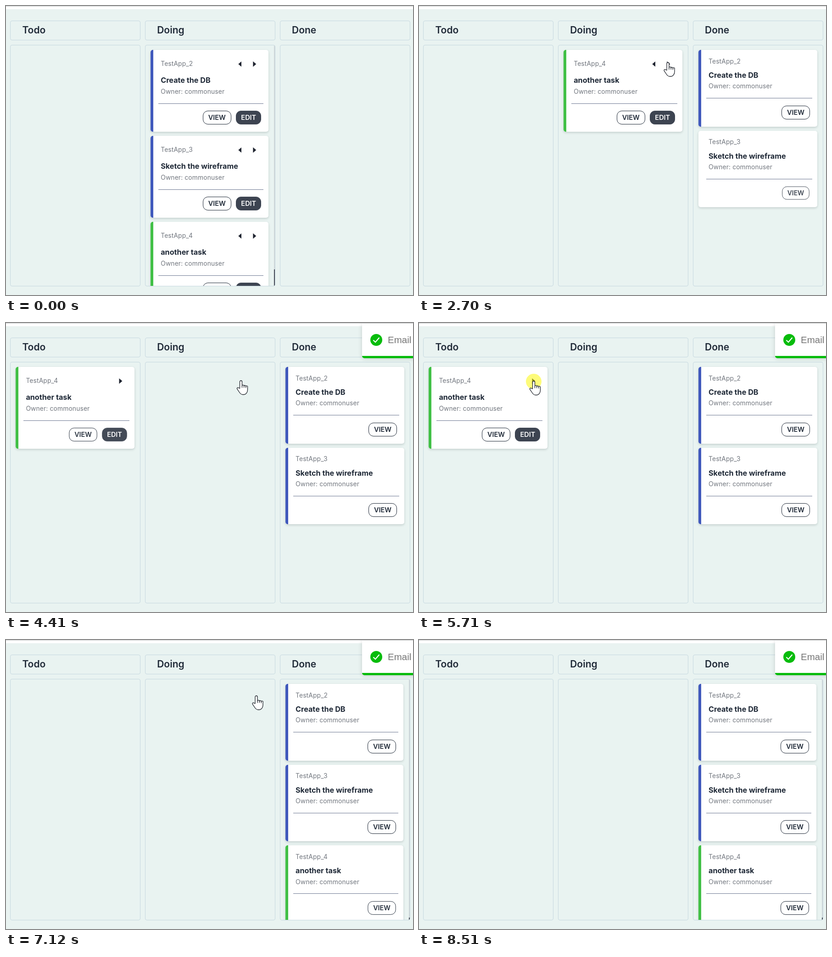
An HTML page that plays this animation: 887x632 px, repeating every 9.04 s.

```html
<!DOCTYPE html>
<html lang="en">
<head>
<meta charset="utf-8">
<title>Task board</title>
<style>
  html, body { margin: 0; width: 100%; height: 100%; overflow: hidden; }
  body { background: #e9f3f1; }
  #stage { position: relative; width: 887px; height: 632px; overflow: hidden; font-family: Inter, sans-serif; color: #1f2937; }
  #stage div { position: absolute; box-sizing: border-box; white-space: nowrap; }
  .top { left: 0; top: 0; width: 887px; height: 7px; background: #fff; border-top: 1px solid #c6c8c9; }
  .head, .body { width: 284px; border: 1px solid #c6d8e0; border-radius: 4px; }
  .head { top: 32px; height: 43px; padding-left: 25px; font: 600 21px/39px Inter, sans-serif; }
  .body { top: 85px; height: 528px; overflow: hidden; }
  .card { left: 11px; background: #fff; border-radius: 5px; box-shadow: 0 2px 5px rgba(40, 60, 60, .2); overflow: hidden; }
  .stripe { left: 0; top: 0; width: 6px; height: 100%; }
  .text { left: 22px; line-height: 20px; margin-top: -10.6px; }
  .small { font-size: 13.8px; color: #71767e; letter-spacing: .15px; }
  .title { font-size: 16.2px; font-weight: 700; }
  .rule { left: 17px; right: 11px; height: 1px; background: #6b7691; }
  .btn { right: 15.5px; width: 62px; height: 30px; border: 1px solid #1f2937; border-radius: 11px; text-align: center; font: 600 14.5px/28px Inter, sans-serif; }
  .edit { width: 55px; background: #3d4451; border-color: #3d4451; color: #fff; }
  .edit + .btn { right: 81px; }
  .tri { top: 25px; width: 7px; height: 12px; background: #1f2430; }
  .next { right: 26.5px; clip-path: polygon(0 0, 100% 50%, 0 100%); }
  .prev { right: 58.5px; clip-path: polygon(100% 0, 0 50%, 100% 100%); }
  .track { right: 0; top: 0; width: 2px; height: 526px; background: #cfd7d8; }
  .thumb { right: 0; bottom: 0; width: 2px; background: #474b57; }
  #toast { left: 776px; top: 1px; width: 960px; height: 76px; background: #fff; border-radius: 0 0 0 5px; box-shadow: 0 1px 10px rgba(0, 0, 0, .16); overflow: hidden; }
  #bar { left: 0; bottom: 0; height: 5px; background: #07bc0c; }
  #toast svg { position: absolute; left: 18px; top: 23px; }
  .msg { left: 56px; top: 22.5px; font: 20.5px/25px "Liberation Sans", Arial, sans-serif; color: #757575; }
  #glow { width: 34px; height: 34px; border-radius: 50%; background: rgba(252, 247, 0, .52); }
  #overlay { position: absolute; left: 0; top: 0; }
</style>
</head>
<body>
<div id="stage">
  <div class="top"></div>
  <div id="board" style="left:0;top:0"></div>
  <div id="toast">
    <svg width="26" height="26"><circle cx="13" cy="13" r="13" fill="#07bc0c"/><path d="M6.5 13.5l4.5 4.5 8.5-10" fill="none" stroke="#fff" stroke-width="2.2"/></svg>
    <div class="msg">Email</div>
    <div id="bar"></div>
  </div>
  <div id="glow"></div>
  <svg id="overlay" width="887" height="632">
    <g id="cursor" fill="#fff" stroke="#20242c" stroke-width="1.3" stroke-linejoin="round">
      <g id="hand">
        <path d="M-2.5 17V2.5a2.5 2.5 0 0 1 5 0V11a2.2 2.2 0 0 1 4.2 .6a2.2 2.2 0 0 1 4.1 .9a2 2 0 0 1 3.7 1.5V20c0 5-3 10.5-8.5 10.5H4c-3.5 0-5-1.5-7-4.5L-8 18.6c-1.6-2.4 1-4.4 3-2.8z"/>
        <path d="M2.5 11v4.5M6.7 11.6v4M10.8 12.5v3.5" fill="none"/>
      </g>
      <path id="arrow" d="M0 0V21l5-4.6 3.4 7.6 3.3-1.5-3.3-7.3h6.6z"/>
    </g>
  </svg>
</div>
<script>
const LOOP = 9040;
const COLUMNS = ['Todo', 'Doing', 'Done'];
const BLUE = '#4059bc', GREEN = '#41c046';
const TASKS = [
  { id: 2, title: 'Create the DB', color: BLUE },
  { id: 3, title: 'Sketch the wireframe', color: BLUE },
  { id: 4, title: 'another task', color: GREEN }
];

// The pointer glides to a spot, clicks, and the task shifts one column.
const START = { x: 848, y: 410 };
const MOVES = [
  { from: 330, to: 1160, x: 546, y: 122, click: 1290, task: 2, dir: 1 },
  { from: 1880, to: 2310, x: 542.5, y: 123.5, click: 2510, task: 3, dir: 1 },
  { from: 3600, to: 3940, x: 512, y: 126, click: 4150, task: 4, dir: -1 },
  { from: 4880, to: 5640, x: 250, y: 127, click: 5710, task: 4, dir: 1 },
  { from: 5980, to: 6530, x: 545.5, y: 122, click: 6860, task: 4, dir: 1 }
];
const EXIT = { from: 7300, to: 8300, x: 790, y: 640 };
const GLOW_TIME = 130, MOVE_DELAY = 190;
const TOAST_IN = 2770, TOAST_AGAIN = 7810, TOAST_LIFE = 5000;

const $ = id => document.getElementById(id);
const show = (id, on) => { $(id).style.display = on ? '' : 'none'; };
const clamp = p => Math.min(1, Math.max(0, p));
const smooth = p => p * p * (3 - 2 * p);
const easeOut = p => 1 - (1 - p) ** 3;
const easeInBack = p => p * p * (2.7 * p - 1.7);
const box = (cls, style, text = '') => `<div class="${cls}" style="${style}">${text}</div>`;

function card(task, col, top, width, fresh) {
  const done = col === 2;
  const lift = done ? 11.5 : 0;
  const pop = fresh ? ' pop' : '';
  const line = (cls, y, text) => box('text ' + cls, `top:${y}px`, text);
  const button = (cls, text) => box('btn' + cls + pop, `top:${133 - lift}px`, text);
  const html = box('stripe' + (fresh ? ' new' : ''), `background:${task.color}`)
    + line('small', 31 - lift / 2, 'TestApp_' + task.id)
    + line('title', 67 - lift, task.title)
    + line('small', 91.5 - lift, 'Owner: commonuser')
    + box('rule', `top:${116.5 - lift}px`)
    + (done ? '' : button(' edit', 'EDIT') + box('tri next', ''))
    + (col === 1 ? box('tri prev', '') : '');
  // VIEW follows EDIT directly so that it can make room for it
  const view = button('', 'VIEW');
  const body = done ? html + view : html.replace('<div class="tri', view + '<div class="tri');
  return box('card', `top:${top}px;width:${width}px;height:${179 - lift}px`, body);
}

function column(tasks, col, moved) {
  const left = 9.4 + col * 293.8;
  const scroll = tasks.length > 2;
  const pitch = col === 2 ? 176.6 : 188;
  const width = scroll ? 256.6 : 258.6;
  const cards = tasks.map((task, i) => card(task, col, 10 + i * pitch, width, task.id === moved));
  const bar = scroll ? box('track', '') + box('thumb', `height:${col === 2 ? 5 : 36}px`) : '';
  return box('head', `left:${left}px`, COLUMNS[col])
    + box('body', `left:${left}px`, cards.join('') + bar);
}

let shown = -1;
function drawBoard(t) {
  const past = MOVES.filter(m => t >= m.click + MOVE_DELAY);
  const last = past[past.length - 1];
  if (past.length !== shown) {
    shown = past.length;
    const place = task => past.reduce((col, m) => m.task === task.id ? col + m.dir : col, 1);
    $('board').innerHTML = COLUMNS.map((_, col) =>
      column(TASKS.filter(task => place(task) === col), col, last && last.task)).join('');
  }
  if (!last) return;
  const age = t - last.click - MOVE_DELAY;
  const p = easeOut(clamp(age / 200));
  for (const el of document.querySelectorAll('.pop')) {
    el.style.transform = p < 1 ? `scale(${.96 + .04 * p})` : 'none';
    el.style.opacity = .85 + .15 * p;
  }
  for (const el of document.querySelectorAll('.new')) el.style.visibility = age < 65 ? 'hidden' : 'visible';
}

function drawToast(t) {
  const out = clamp((t - TOAST_AGAIN) / 230);
  const start = out < 1 ? TOAST_IN : TOAST_AGAIN;
  const shift = out > 0 && out < 1 ? easeInBack(out) : easeInBack(1 - clamp((t - start) / 700));
  show('toast', t >= TOAST_IN);
  $('toast').style.transform = `translateX(${250 * shift}px)`;
  $('bar').style.width = 960 * clamp(1 - (t - start) / TOAST_LIFE) + 'px';
}

function drawCursor(t) {
  let { x, y } = START;
  for (const g of [...MOVES, EXIT]) {
    const p = smooth(clamp((t - g.from) / (g.to - g.from)));
    x += (g.x - x) * p;
    y += (g.y - y) * p;
  }
  const hand = MOVES.some(m => Math.hypot(m.x - x, m.y - y) < 20);
  show('cursor', t >= MOVES[0].from && t < EXIT.to);
  show('hand', hand);
  show('arrow', !hand);
  $('cursor').setAttribute('transform', `translate(${x} ${y})`);
  show('glow', MOVES.some(m => t >= m.click && t < m.click + GLOW_TIME));
  $('glow').style.left = x - 17 + 'px';
  $('glow').style.top = y - 16 + 'px';
}

const origin = performance.now();
function tick() {
  const t = (performance.now() - origin) % LOOP;
  drawBoard(t);
  drawToast(t);
  drawCursor(t);
  requestAnimationFrame(tick);
}
tick();
</script>
</body>
</html>
```
